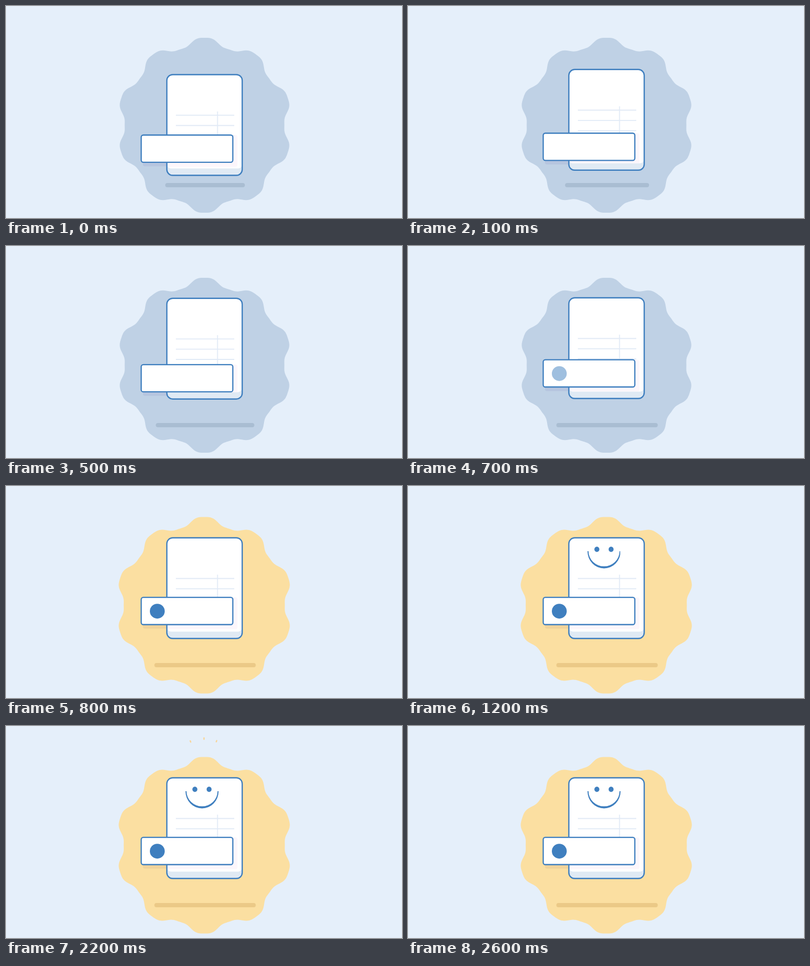
Write an HTML page with a canvas that moves like this. It is 746 px wide and 400 px high and loops after 4600 ms.

```html
<!DOCTYPE html>
<html lang="en">
<head>
<meta charset="utf-8">
<title>Happy parcel label</title>
<style>
html, body { margin: 0; width: 100%; height: 100%; overflow: hidden; background: #e5effa; }
canvas { display: block; }
</style>
</head>
<body>
<canvas id="stage" width="746" height="400"></canvas>
<script>
const LOOP = 4600, STEP = 100;
const BLUE = '#3f7fbf', RULE = '#e1eaf6';
const COOL = { badge: '#bfd1e5', floor: '#a9bdd2', shade: '#b6c5df', scale: 1 };
const WARM = { badge: '#fbdfa1', floor: '#ebc987', shade: '#f0d39b', scale: 1.009 };
const c = document.getElementById('stage').getContext('2d');

const clamp = x => Math.max(0, Math.min(1, x));
const progress = (t, from, to) => clamp((t - from) / (to - from));
const easeOut = p => p * (2 - p);

// Piecewise linear value from [time, value] pairs
function track(t, keys) {
  let [t0, v0] = keys[0];
  for (const [t1, v1] of keys) {
    if (t < t1) return v0 + (v1 - v0) * (t - t0) / (t1 - t0);
    [t0, v0] = [t1, v1];
  }
  return v0;
}

function box(x, y, w, h, r, fill, stroke, width) {
  c.beginPath();
  c.roundRect(x, y, w, h, r);
  if (fill) { c.fillStyle = fill; c.fill(); }
  if (stroke) { c.strokeStyle = stroke; c.lineWidth = width; c.stroke(); }
}

function oval(x, y, rx, ry, fill) {
  c.beginPath();
  c.ellipse(x, y, rx, ry, 0, 0, 2 * Math.PI);
  c.fillStyle = fill;
  c.fill();
}

function line(x1, y1, x2, y2, color, width) {
  c.beginPath();
  c.moveTo(x1, y1);
  c.lineTo(x2, y2);
  c.strokeStyle = color;
  c.lineWidth = width;
  c.stroke();
}

// Ten lobes; the third harmonic rounds them and steepens their flanks
function badge({ badge: color, scale }) {
  c.beginPath();
  for (let deg = 0; deg < 360; deg++) {
    const a = deg * Math.PI / 180;
    const r = (157.7 + 8.3 * Math.cos(10 * a) - Math.cos(30 * a)) * scale;
    c.lineTo(374 - (scale - 1) * 55 + r * Math.sin(a), 225 - r * Math.cos(a));
  }
  c.fillStyle = color;
  c.fill();
}

function card(y, labelY) {
  box(303, y, 142, 190, 11, '#e0eaf4');
  box(303, y, 142, 177, [11, 11, 8, 8], '#fff');
  c.save();
  c.clip();
  box(258, labelY, 178, 60, 4, '#fcf6fb');
  c.restore();
  for (const dy of [76.7, 96, 115.3]) line(320, y + dy, 430, y + dy, RULE, 1.8);
  line(398.5, y + 69.5, 398.5, y + 130, RULE, 1.8);
  box(303, y, 142, 190, 11, null, BLUE, 2.4);
}

function label(y, t) {
  box(254.7, y, 172.6, 51.3, 4, '#fff', BLUE, 2.3);
  c.globalAlpha = progress(t, 600, 800);
  oval(285, y + 26, 14, 14, BLUE);
  c.globalAlpha = 1;
}

function face(t) {
  const pop = easeOut(progress(t, 800, 1000));
  const wink = t >= 2400 && t < 2600;
  oval(355.8, 119.5, 4.7 * pop, 5 * pop, BLUE);
  oval(382.6, 119.5, 4.7 * pop, (wink ? 1.2 : 5) * pop, BLUE);

  c.save();
  c.beginPath();
  c.rect(336, 120, 68 * easeOut(progress(t, 900, 1300)), 40);
  c.clip();
  c.beginPath();
  c.ellipse(369.3, 123, 31.2, 32.6, 0, Math.PI, 0, true);
  c.ellipse(369.3, 123, 29.2, 28.6, 0, 0, Math.PI);
  c.fillStyle = BLUE;
  c.fill();
  c.restore();
}

// Short rays shoot upwards, then shrink to their tips
function sparks(t) {
  if (t < 1700 || t >= 2300) return;
  const head = easeOut(progress(t, 1600, 2000));
  const tail = track(t, [[1800, 0], [2200, 0.88], [2300, 1]]);
  c.lineCap = 'round';
  for (const [x1, y1, x2, y2] of [[355, 47, 347, 28], [373, 44, 373, 22.5], [389, 46, 397, 27.5]]) {
    const at = k => [x1 + (x2 - x1) * k, y1 + (y2 - y1) * k];
    line(...at(tail), ...at(head), '#f8d69a', 2.4);
  }
  c.lineCap = 'butt';
}

function draw(t) {
  const tone = t < 800 ? COOL : WARM;
  const lift = progress(t, 0, 600);
  const cardY = 129.5 - 31.7 * easeOut(lift);
  const labelY = track(t, [[0, 243.5], [300, 233], [700, 214.7], [800, 210.2]]);
  const floorW = 150 + 41 * lift * (1.24 - 0.24 * lift);

  c.fillStyle = '#e5effa';
  c.fillRect(0, 0, 746, 400);
  badge(tone);
  box(375 - floorW / 2, 334, floorW, 8, 4, tone.floor);
  box(258, labelY + 8, 170, 51, 4, tone.shade);
  card(cardY, labelY);
  label(labelY, t);
  face(t);
  sparks(t);
}

const start = performance.now();
function tick() {
  const t = (performance.now() - start) % LOOP;
  draw(Math.floor(t / STEP) * STEP);
  requestAnimationFrame(tick);
}
tick();
</script>
</body>
</html>
```
